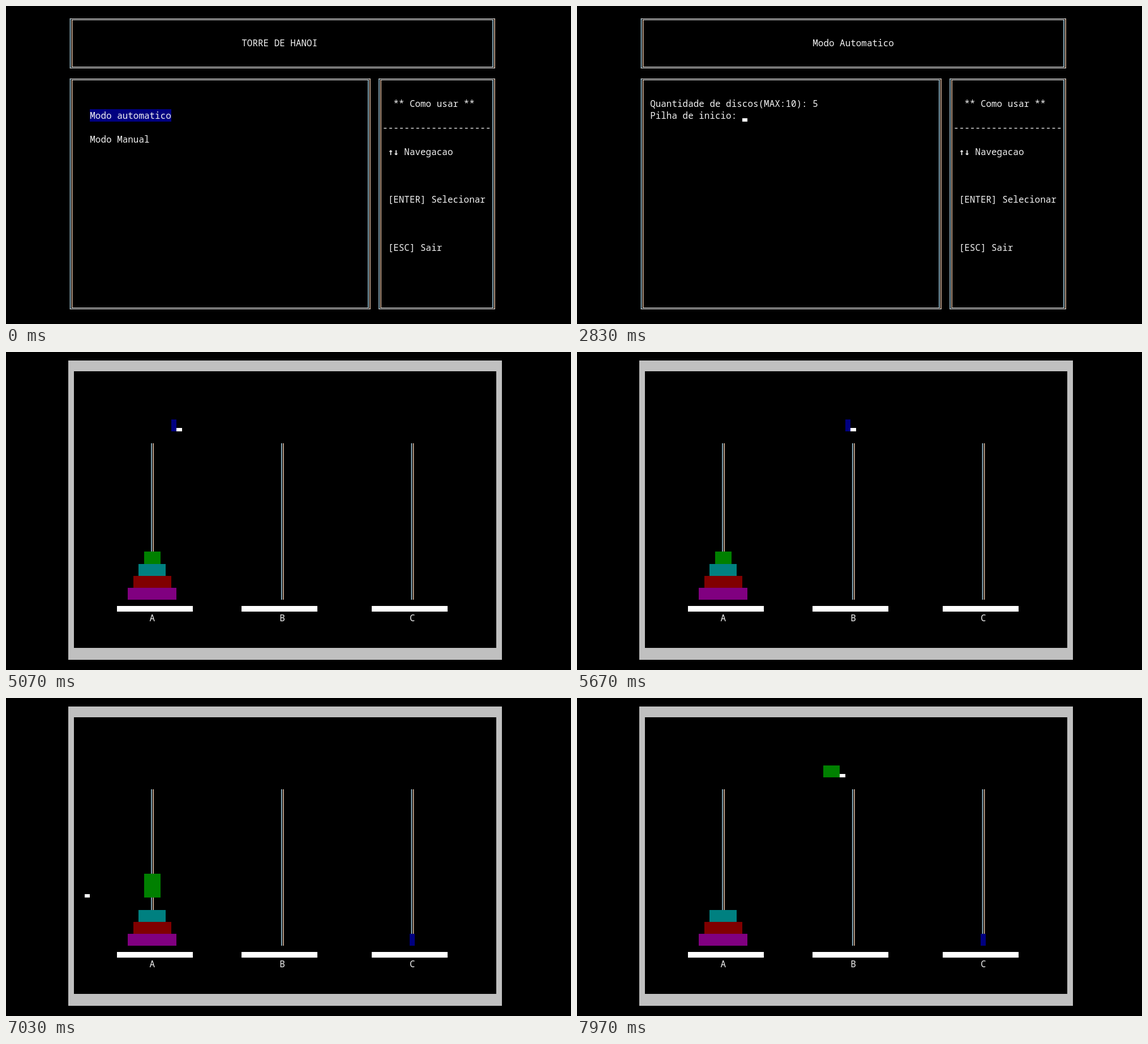
An HTML page with a canvas that plays this animation: 998 px wide and 561 px high, repeating every 8 s.

```html
<!DOCTYPE html>
<html lang="pt">
<head>
<meta charset="utf-8">
<title>Torre de Hanoi</title>
<style>
  html, body { margin: 0; width: 100%; height: 100%; overflow: hidden; background: #000; }
  canvas { display: block; width: 998px; height: 561px; }
</style>
</head>
<body>
<canvas id="stage" width="998" height="561"></canvas>
<script>
const ctx = document.getElementById('stage').getContext('2d');
const LOOP = 8000;

// Text console grid
const CELL_W = 9.57, CELL_H = 21.23, LEFT = 110, TOP = 12.6;
const colX = c => Math.round(LEFT + c * CELL_W);
const rowY = r => Math.round(TOP + r * CELL_H);
const lineX = c => LEFT + (c + 0.5) * CELL_W + 0.3;

const NAVY = '#000080', SILVER = '#c0c0c0', WHITE = '#fff', LINE = '#e8e8e8';
const DISK_COLORS = [NAVY, '#008000', '#008080', '#800000', '#800080'];
const POLES = [15, 39, 63];
const BASES = [9, 32, 56];
const TOP_ROW = 5, FLOOR_ROW = 19;

const SIZE = CELL_W / 0.6;
const TEXT_FONT = `${SIZE}px "Noto Sans Mono", "DejaVu Sans Mono", monospace`;
const ARROW_FONT = `bold ${SIZE}px "DejaVu Sans Mono", monospace`;

function fill(color, x0, y0, x1, y1) {
  ctx.fillStyle = color;
  ctx.fillRect(x0, y0, x1 - x0, y1 - y0);
}

function cells(color, c0, r0, c1, r1) {
  fill(color, colX(c0), rowY(r0), colX(c1), rowY(r1));
}

function text(str, c, r) {
  ctx.fillStyle = '#f2f2f2';
  [...str].forEach((ch, i) => {
    ctx.font = '↑↓'.includes(ch) ? ARROW_FONT : TEXT_FONT;
    ctx.fillText(ch, LEFT + (c + i) * CELL_W, TOP + r * CELL_H + 16.4);
  });
}

function cursor(c, r) {
  const bottom = rowY(r + 1);
  fill(WHITE, colX(c), bottom - 6, colX(c + 1), bottom);
}

// One stroke of a double vertical line, tinted like subpixel rendering
function stroke(x, side, y0, y1) {
  const center = x + side * 1.6;
  fill(side < 0 ? '#a8d4e8' : '#e8c4a8', center - 0.75, y0, center + 0.75, y1);
}

function doubleBox(c0, r0, c1, r1, leftEnd = r1, rightEnd = r1) {
  const x0 = lineX(c0), x1 = lineX(c1);
  const y0 = rowY(r0 + 0.5), y1 = rowY(r1 + 0.5);
  const side = (x, outer, end) => {
    for (const s of [-1, 1]) {
      const d = s === outer ? 1 : -1;
      const from = y0 - d, to = y1 + d + 1;
      if (end === r1) {
        stroke(x, s, from, to);
      } else {
        stroke(x, s, from, rowY(end));
        stroke(x, s, rowY(r1), to);
      }
    }
  };
  side(x0, -1, leftEnd);
  side(x1, 1, rightEnd);
  for (const d of [1, -1]) {
    const reach = d * 1.6 + 0.75;
    fill(LINE, x0 - reach, y0 - d, x1 + reach, y0 - d + 1);
    fill(LINE, x0 - reach, y1 + d, x1 + reach, y1 + d + 1);
  }
}

function header(title) {
  doubleBox(0, 0, 78, 4);
  text(title, 32, 2);
}

function panels() {
  doubleBox(0, 5, 55, 24);
  doubleBox(57, 5, 78, 24);
  text('** Como usar **', 60, 7);
  text('-'.repeat(20), 58, 9);
  text('↑↓ Navegacao', 59, 11);
  text('[ENTER] Selecionar', 59, 15);
  text('[ESC] Sair', 59, 19);
}

function menu() {
  header('TORRE DE HANOI');
  panels();
  cells(NAVY, 4, 8, 19, 9);
  text('Modo automatico', 4, 8);
  text('Modo Manual', 4, 10);
}

function redraw() {
  header('Modo Automatico');
  doubleBox(0, 5, 55, 24, 14, 13);
  cursor(1, 13);
}

// Questions: label, time shown, answer, time typed
const PROMPTS = [
  ['Quantidade de discos(MAX:10): ', 1700, '5', 2400],
  ['Pilha de inicio: ', 2830, 'a', 3430],
  ['Pilha de destino: ', 3930, 'c', 4330]
];

function form(t) {
  header('Modo Automatico');
  panels();
  let c = 2, r = 7, since = 0;
  PROMPTS.forEach(([label, shown, answer, typed], i) => {
    if (t < shown) return;
    const line = label + (t >= typed ? answer : '');
    r = 7 + i;
    c = 2 + line.length;
    since = t >= typed ? typed : shown;
    text(line, 2, r);
  });
  if ((t - since) % 1060 < 530) cursor(c, r);
}

// Disk moves: disk, start column and row, direction, steps, ms per step
const START = 4592, LIFT = 34.85, SLIDE = 31.7;
const MOVES = [
  [0, 15, 15, 0, -1, 10, LIFT],
  [0, 15, 5, 1, 0, 48, SLIDE],
  [0, 63, 5, 0, 1, 14, LIFT],
  [1, 15, 16, 0, -1, 11, LIFT],
  [1, 15, 5, 1, 0, 24, SLIDE]
];

function disk(i, c, r) {
  cells(DISK_COLORS[i], c - i, r, c + i + 1, r + 1);
}

function pose(t) {
  let elapsed = Math.max(0, t - START);
  for (const [i, c, r, dx, dy, steps, ms] of MOVES) {
    if (elapsed < steps * ms) {
      const u = elapsed / ms, n = Math.floor(u);
      return { i, c: c + dx * n, r: r + dy * n, dy, n, phase: u - n };
    }
    elapsed -= steps * ms;
  }
}

function tower(t) {
  cells(SILVER, 0, 0.12, 80, 25);
  cells('#000', 1, 1, 79, 24);
  POLES.forEach((c, i) => {
    for (const s of [-1, 1]) stroke(lineX(c), s, rowY(7), rowY(20));
    cells(WHITE, BASES[i], 20.5, BASES[i] + 14, 21);
    text('ABC'[i], c, 21);
  });

  const p = pose(t);
  for (let i = p.i + 1; i < DISK_COLORS.length; i++) disk(i, POLES[0], 15 + i);
  if (p.i === 1) disk(0, POLES[2], FLOOR_ROW);
  disk(p.i, p.c, p.r);

  // The console clears the old row after each vertical step
  if (p.dy && p.n && p.phase < 0.35) {
    disk(p.i, p.c, p.r - p.dy);
    cursor(2 + Math.floor(p.phase * 5), p.r - p.dy);
  } else if (!p.dy && p.phase > 0.85) {
    cursor(2, TOP_ROW);
  } else {
    cursor(p.c + p.i + 1, p.r);
  }
}

function render(t) {
  fill('#000', 0, 0, 998, 561);
  if (t < 1665) menu();
  else if (t < 1700) redraw();
  else if (t < 4530) form(t);
  else tower(t);
}

const begin = performance.now();
function tick() {
  render((performance.now() - begin) % LOOP);
  requestAnimationFrame(tick);
}
tick();
</script>
</body>
</html>
```
